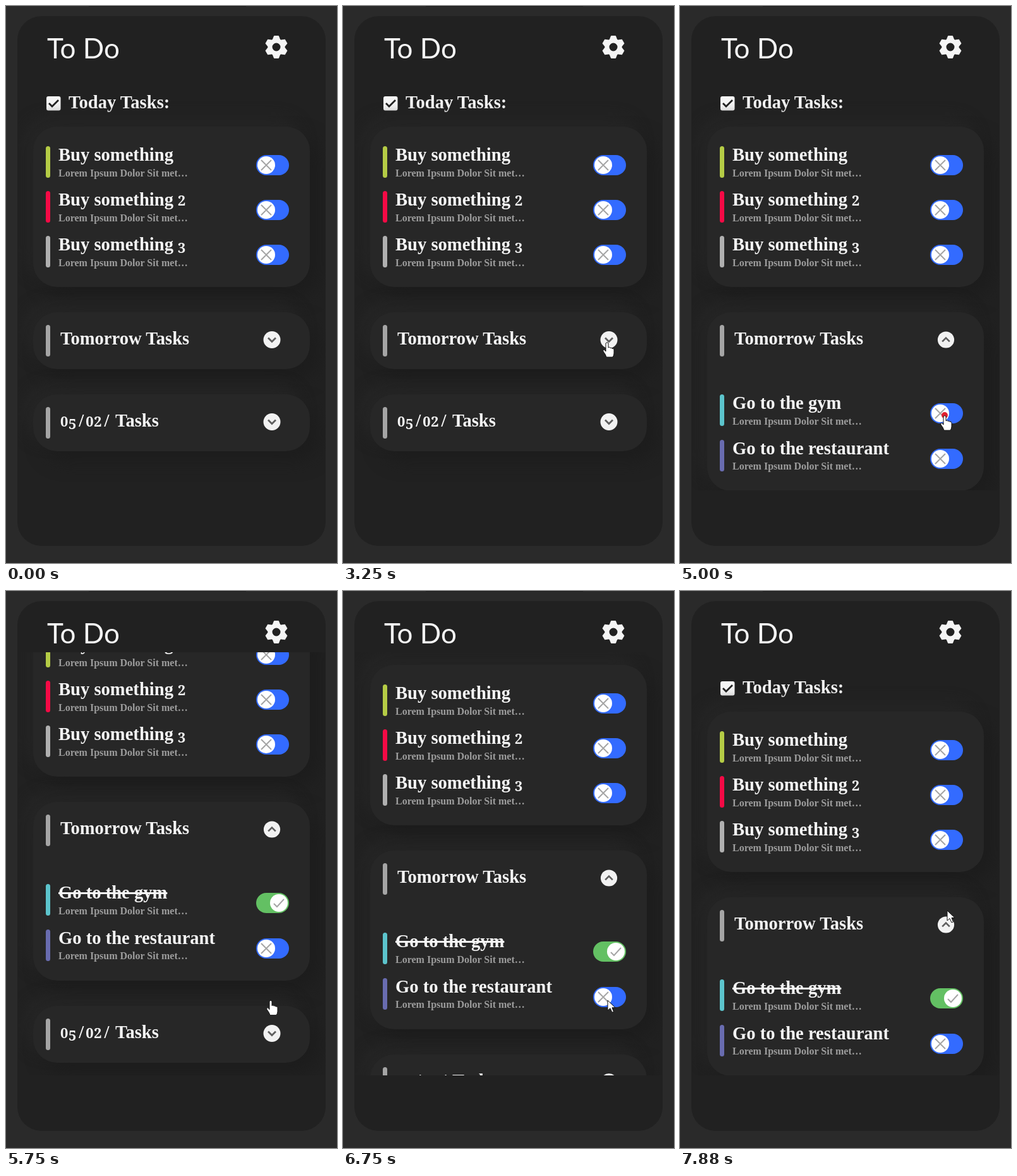
An HTML page that plays this animation: 524 px wide and 882 px high, repeating every 8 s.

```html
<!DOCTYPE html>
<html lang="en">
<head>
<meta charset="utf-8">
<title>To Do</title>
<style>
html, body { margin: 0; width: 100%; height: 100%; overflow: hidden; background: #2a2a2a; }
#stage { position: relative; width: 524px; height: 882px; overflow: hidden; background: #2a2a2a; }
#stage div, #stage p, #stage svg { position: absolute; margin: 0; }
#stage svg { overflow: visible; }
#notch { left: 131px; top: 0; width: 249px; height: 1px; background: #1c1c1c; }
#panel { left: 18px; top: 16px; width: 488px; height: 839px; border-radius: 38px; background: #212121; }
#list { left: 18px; top: 97px; width: 488px; height: 670px; overflow: hidden; }
#scroll { left: -18px; top: -97px; }
.card { left: 43px; width: 438px; border-radius: 38px; background: #272727; overflow: hidden;
  box-shadow: 16px 16px 28px #1d1d1d, -14px -14px 22px #262626; }
p { line-height: 0; white-space: pre; color: #f5f5f5; font: bold 28.6px/0 "Liberation Serif", serif; }
p.sub { font-size: 16px; color: #9c9c9c; }
p.done { text-decoration: line-through 3px; }
p.head { font: 44px/0 Lato, sans-serif; }
p i { font: 600 22px/0 "Noto Serif", serif; letter-spacing: .8px; position: relative; }
p i.low { top: 4px; }
p b { padding: 0 3px; }
.bar { left: 20px; width: 7px; height: 50px; border-radius: 3.5px; }
.toggle { left: 353px; width: 52px; height: 32px; border-radius: 16px; background: #336bff; }
</style>
</head>
<body>
<div id="stage">
  <div id="notch"></div>
  <div id="panel"></div>
  <div id="list"><div id="scroll"></div></div>
  <div id="top"></div>
  <svg id="pointer" width="1" height="1">
    <circle id="ripple" stroke="#e02030" stroke-width="5"/>
    <g id="cursor" stroke="#111" stroke-linejoin="round" fill="#fff">
      <path id="arrow" d="M0 0V16L4 12.500L7 19L9.500 18L7 11.500H12Z"/>
      <path id="hand" d="M-2 1Q0 -2 2 1V8Q4 6 5 8.500Q7 7 8 9.500Q10.500 8 11 11V17Q11 20 9 23H-1Q-2 19 -6 14Q-7 11 -4.500 11L-2 14Z"/>
    </g>
  </svg>
</div>
<script>
const $ = id => document.getElementById(id);
const LOOP = 8000, STEP = 125;

// Digits are set small, in the manner of old-style figures.
const figures = s => s.replace(/\d|\//g, c =>
  c === "/" ? "<b>/</b>" : `<i style="font-style:normal" class="${"35".includes(c) ? "low" : ""}">${c}</i>`);
const text = (x, y, s, cls = "", id = "") =>
  `<p id="${id}" class="${cls}" style="left:${x}px;top:${y}px">${figures(s)}</p>`;
const bar = (y, color) => `<div class="bar" style="top:${y}px;background:${color}"></div>`;

const row = (y, color, title, id = "") => bar(y, color) +
  text(40, y + 14, title, "", id && id + "Title") +
  text(40, y + 42.5, "Lorem Ipsum Dolor Sit met…", "sub") +
  `<div class="toggle" id="${id}" style="top:${y + 14}px">
    <svg width="52" height="32"><g transform="translate(16 16)" fill="none" stroke="#a5a5a5" stroke-width="2">
      <circle r="14" fill="#fff" stroke="none"/>
      <path d="M-8-8L8 8M8-8L-8 8"/></g></svg></div>`;

const header = (title, id) => bar(20, "#a5a5a5") + text(43, 42, title) +
  `<svg width="1" height="1"><g id="${id}" transform="translate(378 43.500)">
    <circle r="13.500" fill="#f2f2f2"/>
    <path d="M-6-3L0 3L6-3" fill="none" stroke="#606060" stroke-width="2.800"/></g></svg>`;

const card = (id, top, height, body) =>
  `<div class="card" id="${id}" style="top:${top}px;height:${height}px">${body}</div>`;

$("scroll").innerHTML =
  `<svg width="1" height="1"><rect x="64" y="143" width="22.500" height="22.500" rx="3" fill="#f5f5f5"/>
    <path d="M68 154L73 159L83 149" fill="none" stroke="#212121" stroke-width="2.800"/></svg>` +
  text(99, 152.5, "Today Tasks:") +
  card("today", 191, 254, row(31, "#b5cc45", "Buy something") +
    row(102, "#f50a45", "Buy something 2") + row(173, "#b0b0b0", "Buy something 3")) +
  card("tomorrow", 485, 90, header("Tomorrow Tasks", "chevron") +
    row(130, "#5cc4cc", "Go to the gym", "gym") + row(201.5, "#696cb0", "Go to the restaurant")) +
  card("later", 615, 90, header("05/02/ Tasks", "laterChevron"));

const teeth = [0, 60, 120, 180, 240, 300].map(a =>
  `<path d="M-6-11L-3.500-17.500H3.500L6-11Z" transform="rotate(${a})"/>`).join("");
$("top").innerHTML = text(65, 65.5, "To Do", "head") +
  `<svg width="1" height="1"><g transform="translate(428 65)" fill="#f5f5f5" stroke="#f5f5f5" stroke-linejoin="round">
    ${teeth}<circle r="10" fill="none" stroke-width="7"/></g></svg>`;

const clamp = p => Math.max(0, Math.min(1, p));
const span = (t, a, b) => clamp((t - a) / (b - a));
const easeOut = p => 1 - (1 - p) ** 2;
const smooth = p => p * p * (3 - 2 * p);
const mix = (a, b, p) => a + (b - a) * p;

// Pointer path: time, x, y
const path = [[500, 358, 101], [625, 356, 147], [2000, 356, 147], [2125, 385, 135], [2250, 402, 126],
  [2500, 415, 300], [2875, 420, 512], [3000, 419, 514], [3250, 418, 533], [4300, 418, 533],
  [4950, 419, 649], [7300, 419, 648], [7500, 440, 600], [7875, 423, 506], [8000, 423, 506]];

function pointerAt(t) {
  const i = Math.max(1, path.findIndex(k => k[0] >= t));
  const [a, b] = [path[i - 1], path[i]], p = span(t, a[0], b[0]);
  return [mix(a[1], b[1], p), mix(a[2], b[2], p)];
}

function drawRipple(t, x, y) {
  const age = t - (t < 4500 ? 3500 : 5000);
  const p = clamp(age / 375), ring = $("ripple");
  ring.style.display = age >= 0 && age < 480 ? "" : "none";
  ring.setAttribute("cx", x);
  ring.setAttribute("cy", y - 1);
  ring.setAttribute("r", mix(2.5, 25, p));
  ring.setAttribute("fill", p ? "none" : "#e02030");
  ring.setAttribute("opacity", mix(1, .13, p));
}

function drawToggle(t) {
  const p = smooth(span(t, 5050, 5375)), on = t >= 5125;
  $("gym").style.background = `rgb(${mix(51, 99, p)},${mix(107, 192, p)},${mix(255, 99, p)})`;
  const knob = $("gym").querySelector("g");
  knob.setAttribute("transform", `translate(${mix(16, 36, p)} 16)`);
  knob.lastElementChild.setAttribute("d", on ? "M-8 1L-3 6L8-6" : "M-8-8L8 8M8-8L-8 8");
  $("gymTitle").className = on ? "done" : "";
}

function draw(t) {
  const open = easeOut(span(t, 3490, 4090));
  $("tomorrow").style.height = mix(90, 283, open) + "px";
  $("later").style.top = mix(615, 808, open) + "px";
  $("chevron").setAttribute("transform",
    `translate(378 43.5) rotate(${180 * span(t, 3500, 3800)}) scale(${mix(1, .97, open)})`);
  drawToggle(t);

  const scroll = 151 * (smooth(span(t, 5375, 5740)) - smooth(span(t, 6445, 7045)));
  $("scroll").style.top = -97 - Math.round(scroll) + "px";

  const [x, y] = pointerAt(t);
  const hand = t >= 2875 && t < 4500 || t >= 4800 && t < 6125;
  $("cursor").style.display = t < 500 ? "none" : "";
  $("cursor").setAttribute("transform", `translate(${x} ${y})`);
  $("hand").style.display = hand ? "" : "none";
  $("arrow").style.display = hand ? "none" : "";
  drawRipple(t, x, y);
}

const start = performance.now();
function tick() {
  const t = (performance.now() - start) % LOOP;
  draw(Math.floor((t + 5) / STEP) * STEP % LOOP); // eight pictures a second
  requestAnimationFrame(tick);
}
tick();
</script>
</body>
</html>
```
